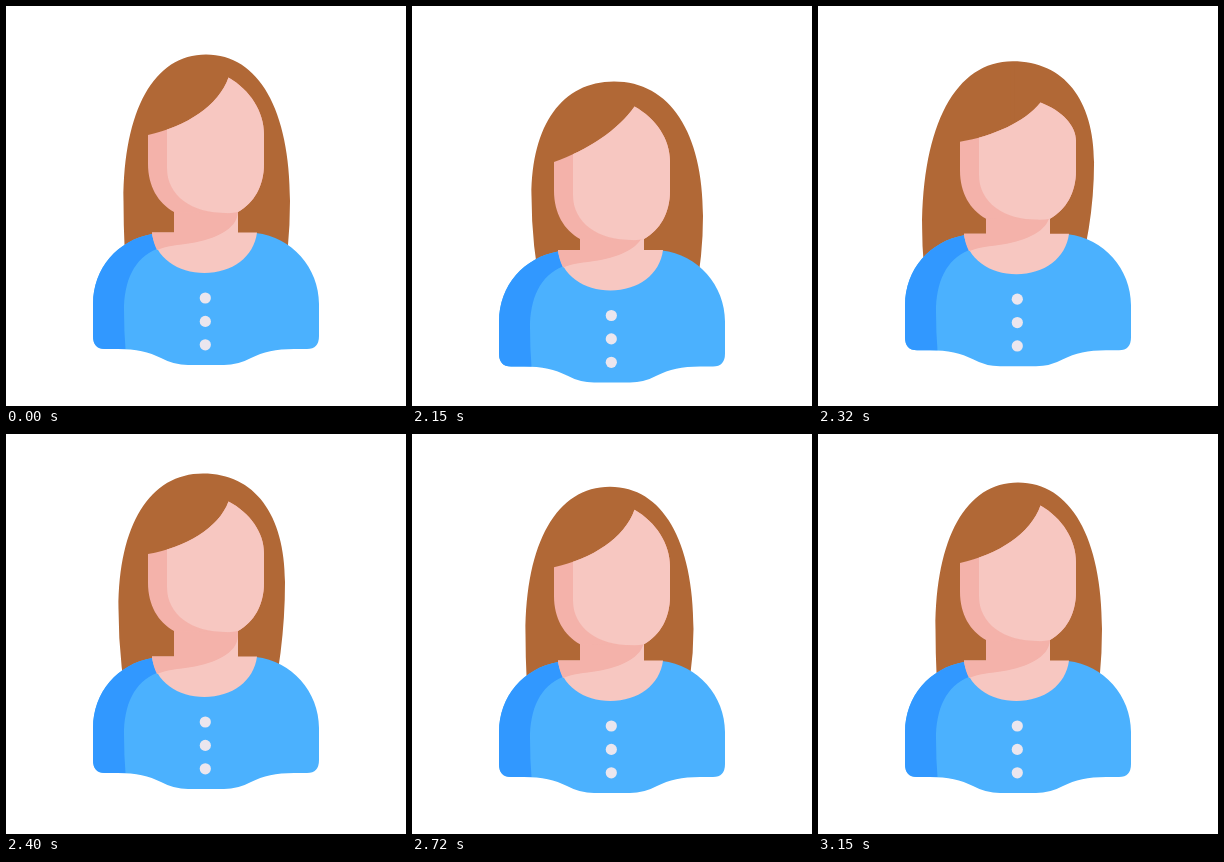
Animation, 400 px wide and 400 px high, one loop 3170 ms. Source, as an HTML page with a canvas:

```html
<!DOCTYPE html>
<html lang="en">
<head>
<meta charset="utf-8">
<title>Avatar bounce</title>
<style>
  html, body { margin: 0; width: 100%; height: 100%; overflow: hidden; background: #fff; }
  canvas { display: block; width: 400px; height: 400px; }
</style>
</head>
<body>
<canvas id="stage" width="400" height="400"></canvas>
<script>
const ctx = document.getElementById('stage').getContext('2d');
const LOOP = 3170, START = 2020;
const COLORS = {
  hair: '#b16836', skin: '#f7c7c1', shade: '#f4b2aa',
  shirt: '#4bb1fe', shirtDark: '#3198ff', button: '#ebe6ee'
};

// Offsets of body and head, fringe lift and bend, then the hair outline.
const FIELDS = ['body', 'head', 'lift', 'bend', 'topX',
  'leftX', 'leftY', 'leftEnd', 'rightX', 'rightY', 'rightEnd'];
const REST = [0, 0, 0, 1, 200, 117.5, 195, 122, 284, 195, 275];
const KEYS = [
  [2020, [2, -1, -0.7, 1, 200, 118.5, 190, 123, 284.5, 210, 283]],
  [2150, [17.5, 27, 2, 0.6, 202, 119.5, 190, 130, 291, 210, 283]],
  [2250, [8.5, 22.3, 28, 0.4, 193, 97.5, 262, 98, 274, 172, 250]],
  [2400, [-4, -9, 5, 1, 197, 112.5, 175, 125, 279, 148, 261]],
  [2550, [-1, -4.5, 2, 1, 197.5, 113, 188, 121, 280, 172, 264]],
  [2720, [0, 4.2, 0, 1, 198, 113.5, 200, 118, 281.5, 195, 268]],
  [3150, REST]
];

const toPose = values => Object.fromEntries(FIELDS.map((name, i) => [name, values[i]]));

function slope(k, j) {
  const span = i => KEYS[i + 1][0] - KEYS[i][0];
  const rate = i => (KEYS[i + 1][1][j] - KEYS[i][1][j]) / span(i);
  if (k === 0 || k === KEYS.length - 1) return 0;
  const a = rate(k - 1), b = rate(k);
  if (a * b <= 0) return 0;
  const wa = span(k - 1) + 2 * span(k), wb = 2 * span(k - 1) + span(k);
  return (wa + wb) / (wa / a + wb / b);
}

// Monotone cubic interpolation between neighbouring keys.
function poseAt(t) {
  if (t < START) return toPose(REST);
  let k = 0;
  while (k < KEYS.length - 2 && t >= KEYS[k + 1][0]) k++;
  const [t0, from] = KEYS[k], [t1, to] = KEYS[k + 1];
  const h = t1 - t0, s = Math.min(1, (t - t0) / h);
  const ease = s * s * (3 - 2 * s);
  return toPose(from.map((v, j) =>
    v + (to[j] - v) * ease
      + h * s * (1 - s) * ((1 - s) * slope(k, j) - s * slope(k + 1, j))));
}

// Poses advance in alternating steps of 30 and 20 ms.
function stepTime(t) {
  if (t < START) return t;
  const u = t - START, part = u % 50;
  return START + u - part + (part >= 30 ? 30 : 0);
}

function fill(color, path) {
  ctx.fillStyle = color;
  ctx.fill(path);
}

function drawHair(p) {
  const top = 48.5 + p.head, end = 290;
  const path = new Path2D();
  const side = (x, y, endX) => {
    path.moveTo(p.topX, top);
    path.bezierCurveTo(p.topX + (x - p.topX) * 0.63, top, x, y - (y - top) * 0.62, x, y);
    path.quadraticCurveTo(x, (y + end) / 2, endX, end);
    path.lineTo(p.topX, end);
    path.closePath();
  };
  side(p.leftX, p.leftY, p.leftEnd);
  side(p.rightX, p.rightY, p.rightEnd);
  ctx.fillStyle = COLORS.hair;
  ctx.fill(path);
  ctx.fillRect(p.topX - 2, top + 1, 4, 200);
}

const SHIRT = new Path2D(`M87 298C87 262 112 234 146 228L200 240L250 227
  C286 231 313 262 313 298V330Q313 343 301 343H288C270 343 257 346 245 352
  Q232 359 218 359H182Q168 359 155 352C143 346 130 343 112 343H99Q87 343 87 330Z`);
const SHIRT_SIDE = new Path2D(`M87 298C87 262 112 234 146 228L151 243
  C128 252 118 275 118 305Q118 325 119.5 343H99Q87 343 87 330Z`);
const NECK = new Path2D(`M168 180H232V226.5H251C248 251 226 267 198.5 267
  C172 267 149 252 146 226.5H168Z`);
const NECK_SHADE = new Path2D(`M168 180H232V206C231 224 208 233 186 237
  C172 239 160 240 151 244Q147 236 146 226.5H168Z`);

function drawBody(p) {
  ctx.save();
  ctx.translate(0, p.body);
  fill(COLORS.shirt, SHIRT);
  fill(COLORS.shirtDark, SHIRT_SIDE);
  fill(COLORS.skin, NECK);
  fill(COLORS.shade, NECK_SHADE);
  for (let i = 0; i < 3; i++) {
    const button = new Path2D();
    button.arc(199.3, 292 + 23.4 * i, 5.6, 0, Math.PI * 2);
    fill(COLORS.button, button);
  }
  ctx.restore();
}

function drawFace(p) {
  const peakX = 222.5, peakY = 71.5 + p.lift, left = 129, right = 128;
  const drop = right - peakY, rise = peakY - left;
  const face = new Path2D();
  face.moveTo(142, left);
  face.bezierCurveTo(
    168.8 + 11 * p.bend, left + rise / 3 + 11 * p.bend,
    195.7 + 17 * p.bend, left + rise * 2 / 3 + 9 * p.bend, peakX, peakY);
  face.bezierCurveTo(244, peakY + drop * 0.22, 258, peakY + drop * 0.6, 258, right);
  face.lineTo(258, 158);
  face.bezierCurveTo(258, 180, 248, 197, 232, 206);
  face.quadraticCurveTo(226, 207.5, 218, 207);
  face.lineTo(168, 206);
  face.bezierCurveTo(152, 197, 142, 180, 142, 158);
  face.closePath();

  ctx.save();
  ctx.translate(0, p.head);
  fill(COLORS.shade, face);
  ctx.clip(face);
  fill(COLORS.skin, new Path2D('M161 60V162C161 190 186 207 220 207L232 210H262V60Z'));
  ctx.restore();
}

function draw(now) {
  const pose = poseAt(stepTime(now % LOOP));
  ctx.fillStyle = '#fff';
  ctx.fillRect(0, 0, 400, 400);
  drawHair(pose);
  drawBody(pose);
  drawFace(pose);
}

let begin;
function tick(now) {
  begin ??= now;
  draw(now - begin);
  requestAnimationFrame(tick);
}
draw(0);
requestAnimationFrame(tick);
</script>
</body>
</html>
```
